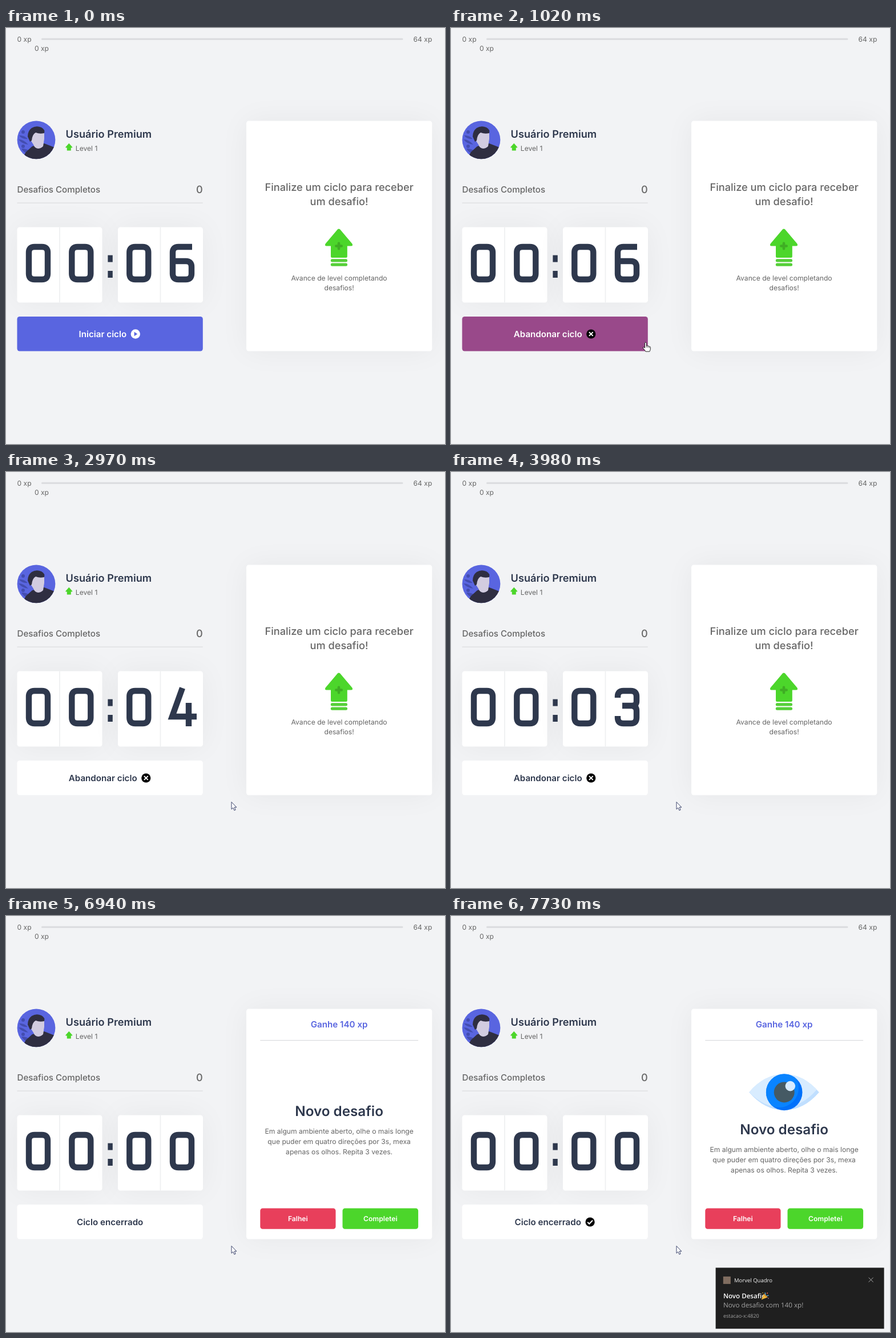
An HTML page with a canvas for the animation above (8000 ms loop, 769x728 px).

```html
<!DOCTYPE html>
<html lang="pt">
<head>
<meta charset="utf-8">
<title>Ciclo</title>
<style>
html, body { margin: 0; width: 100%; height: 100%; overflow: hidden; background: #f2f3f5; }
canvas { display: block; }
</style>
</head>
<body>
<canvas id="stage" width="769" height="728"></canvas>
<script>
const ctx = document.getElementById('stage').getContext('2d');
const LOOP = 8000, STEP = 80, REM = 12.12;
const UI = 'Inter, sans-serif', TOAST = '"Open Sans", "Noto Sans", sans-serif';
const INK = '#2e384d', GRAY = '#666666', GREEN = '#4cd62b', WHITE = '#ffffff';
const BLUE = [89, 101, 224], BLUE_DARK = [73, 83, 184], RED = [232, 63, 91];
const PAPER = [255, 255, 255], INK_RGB = [46, 56, 77];

const clamp = v => Math.max(0, Math.min(1, v));
const mix = (a, b, k) => a.map((v, i) => v + (b[i] - v) * k);
const rgb = c => `rgb(${c.map(Math.round).join(',')})`;

// y is the middle of the capital letters
function text(str, x, y, size, weight, color, align = 'left', family = UI) {
  ctx.font = `${weight} ${size}px ${family}`;
  ctx.textAlign = align;
  ctx.fillStyle = color;
  ctx.fillText(str, x, y + size * 0.364);
}

function box(x, y, w, h, r, color, shadow) {
  ctx.save();
  if (shadow) {
    ctx.shadowColor = 'rgba(0,0,0,.05)';
    ctx.shadowBlur = 52;
  }
  ctx.fillStyle = color;
  ctx.beginPath();
  ctx.roundRect(x, y, w, h, r);
  ctx.fill();
  ctx.restore();
}

function disc(x, y, r, color) {
  ctx.fillStyle = color;
  ctx.beginPath();
  ctx.arc(x, y, r, 0, Math.PI * 2);
  ctx.fill();
}

function fillPath(d, color) {
  ctx.fillStyle = color;
  ctx.fill(new Path2D(d));
}

function strokePath(d, color, width, cap = 'butt') {
  ctx.strokeStyle = color;
  ctx.lineWidth = width;
  ctx.lineCap = cap;
  ctx.stroke(new Path2D(d));
}

function at(x, y, draw) {
  ctx.save();
  ctx.translate(x, y);
  draw();
  ctx.restore();
}

// Digit centre lines in a 43 x 67 cell
const TOP_ARC = 'M5 17V15Q5 5 15 5H28Q38 5 38 15V';
const LOW_ARC = 'V52Q38 62 28 62H15Q5 62 5 52V49';
const DIGITS = [
  'M15 5H28Q38 5 38 15V52Q38 62 28 62H15Q5 62 5 52V15Q5 5 15 5Z',
  '',
  TOP_ARC + '22Q38 28 34 33L9 62M1 62H42',
  TOP_ARC + '23Q38 31 30 31H13M30 31Q38 32 38 40' + LOW_ARC,
  'M22 0L4 50H47M33 26V67',
  'M40 5H5V30H28Q38 30 38 40' + LOW_ARC,
  'M39 5H15Q5 5 5 15V52Q5 62 15 62H28Q38 62 38 52V40Q38 30 28 30H5'
];

function digit(n, x) {
  at(x, 378, () => {
    if (n === 1) fillPath('M31.5 0V67H21V12L7 20V9L22 0Z', INK);
    else strokePath(DIGITS[n], INK, 10.4);
  });
}

function header() {
  text('0 xp', 19.5, 20, REM, 400, GRAY);
  text('64 xp', 746.3, 20, REM, 400, GRAY, 'right');
  box(62, 17.7, 633.5, 3.4, 2, '#dcdde0');
  text('0 xp', 62.5, 35.3, REM, 400, GRAY, 'center');
}

function avatar() {
  ctx.save();
  ctx.beginPath();
  ctx.arc(53, 195.8, 33.4, 0, Math.PI * 2);
  ctx.clip();
  ctx.fillStyle = rgb(BLUE);
  ctx.fillRect(19, 162, 68, 68);
  const leaf = '#434db0';
  disc(30, 182, 3, leaf);
  disc(30, 207, 3, leaf);
  fillPath('M23 188Q31 187 38 194Q28 195 23 188Z', leaf);
  fillPath('M22 195Q31 195 39 204Q28 203 22 195Z', leaf);
  fillPath('M27 211Q36 211 43 216L36 219Q30 217 27 211Z', leaf);
  fillPath('M27 230L35 217L46 207L67 202L90 211V230Z', '#2f2e41');
  fillPath('M44 184L52 180L67 181V194L65 207Q61 211 56 211Q50 210 48 204L43 196Z', '#d2cce0');
  fillPath('M42 199L38 190Q38 180 45 175Q53 170 62 174Q69 178 67 184Q59 186 52 183Q46 186 45 197Z', '#2f2e41');
  ctx.restore();
}

function profile() {
  avatar();
  text('Usuário Premium', 104.6, 185.2, REM * 1.5, 600, INK);
  fillPath('M110.3 201.8L116.3 208.6Q116.6 209.6 115.4 209.6H113.8V214.6H106.8V209.6H105.2Q104 209.6 104.3 208.6Z', GREEN);
  text('Level 1', 121.8, 210.3, REM, 400, GRAY);
  text('Desafios Completos', 19.5, 282.8, REM * 1.25, 500, GRAY);
  text('0', 344.8, 282.8, REM * 1.5, 500, GRAY, 'right');
  ctx.fillStyle = '#d7d8da';
  ctx.fillRect(19.5, 305.6, 325.3, 1);
}

function countdown(sec) {
  for (const x of [19.5, 196]) {
    box(x, 348.5, 149, 132, 4.3, WHITE, true);
    ctx.fillStyle = '#eeeff1';
    ctx.fillRect(x + 73.6, 348.5, 1.7, 132);
  }
  [35, 110.3, 211.3].forEach(x => digit(0, x));
  digit(sec, 287);
  ctx.fillStyle = INK;
  ctx.fillRect(178.4, 397.6, 8.4, 12);
  ctx.fillRect(178.4, 425, 8.4, 12);
}

function button(t, q) {
  const label = (str, x, color) => text(str, x, 535.2, REM * 1.25, 600, color);
  const icon = (x, d) => {
    disc(x, 535.5, 8.1, '#000');
    at(x, 535.5, () => strokePath(d, WHITE, 2));
  };
  let bg = mix(BLUE, BLUE_DARK, clamp((q - 600) / 200));
  const fade = clamp((q - 1050) / 200);
  if (q >= 1020) bg = fade ? mix(RED, PAPER, fade) : mix(BLUE_DARK, RED, 0.5);
  box(19.5, 505, 325.3, 60.4, 4.3, rgb(bg));
  if (q < 1020) {
    label('Iniciar ciclo', 127.6, WHITE);
    disc(226.8, 535.5, 8.2, WHITE);
    fillPath('M224.6 531.8L230.2 535.5L224.6 539.2Z', rgb(bg));
  } else if (t < 6940) {
    label('Abandonar ciclo', 109.8, rgb(mix(PAPER, INK_RGB, fade)));
    icon(245.3, 'M-3.4 -3.4L3.4 3.4M3.4 -3.4L-3.4 3.4');
  } else {
    const loaded = t >= 7170;
    label('Ciclo encerrado', loaded ? 111.6 : 124, INK);
    if (loaded) icon(243.6, 'M-4.4 0.2L-1.4 3.2L4.4 -2.8');
  }
}

function lines(list, y, gap, size, weight) {
  list.forEach((s, i) => text(s, 583.6, y + i * gap, size, weight, GRAY, 'center'));
}

function waiting() {
  lines(['Finalize um ciclo para receber', 'um desafio!'], 278.3, 25.3, REM * 1.5, 500);
  fillPath('M581 352.2Q583 350.6 585 352.2L606.4 377.4Q608.4 381.4 604.5 381.6H597.8V400Q597.8 402 595.8 402H571Q569 402 569 400V381.6H561.5Q557.6 381.4 559.6 377.4Z', GREEN);
  strokePath('M583 376.8V386.2M578.3 381.5H587.7', '#3fae24', 4.6, 'round');
  box(568.8, 404.2, 29.2, 5.2, 2.5, '#55cf38');
  box(568.8, 411.6, 29.2, 5.2, 2.5, '#55cf38');
  lines(['Avance de level completando', 'desafios!'], 437.6, 17, REM, 400);
}

function eye() {
  const lid = 'M522 308.5Q549 276.8 583.5 276.8T645 308.5Q618 340 583.5 340T522 308.5Z';
  ctx.save();
  ctx.clip(new Path2D(lid));
  fillPath(lid, '#c0dfff');
  at(-4, -5, () => {
    fillPath(lid, '#d8ecff');
    ctx.fillRect(526, 270, 100, 39);
  });
  ctx.restore();
  ctx.save();
  ctx.beginPath();
  ctx.arc(583.7, 308.4, 31.8, 0, Math.PI * 2);
  ctx.clip();
  ctx.fillStyle = '#0071fb';
  ctx.fillRect(550, 275, 68, 68);
  disc(575, 301, 34, '#0a84ff');
  ctx.restore();
  disc(583.7, 308.4, 18, '#455a64');
  disc(594.3, 297.6, 8.8, '#d8ecff');
}

function challenge(loaded) {
  text('Ganhe 140 xp', 583.6, 189.6, REM * 1.25, 600, rgb(BLUE), 'center');
  ctx.fillStyle = '#dcdde0';
  ctx.fillRect(445.3, 217, 276.8, 1.3);
  if (loaded) eye();
  at(0, loaded ? 0 : -32, () => {
    text('Novo desafio', 583.6, 373.2, REM * 2, 600, INK, 'center');
    lines(['Em algum ambiente aberto, olhe o mais longe',
      'que puder em quatro direções por 3s, mexa',
      'apenas os olhos. Repita 3 vezes.'], 408.2, 18.1, REM, 400);
  });
  box(445.3, 511.4, 132.2, 36.4, 4.3, rgb(RED));
  box(589.5, 511.4, 132.6, 36.4, 4.3, GREEN);
  text('Falhei', 511.3, 529.7, REM, 600, WHITE, 'center');
  text('Completei', 655.8, 529.7, REM, 600, WHITE, 'center');
}

function popper() {
  fillPath('M80 56L84.5 46L90.5 52Z', '#f2b83c');
  strokePath('M84.5 46L90.5 52', '#d98a25', 2);
  strokePath('M87 48Q88 45 86 43.5M89 50Q91 47.5 93 49', '#58b4e8', 1.2);
  disc(90.5, 44.5, 1.1, '#e85b4a');
  disc(82.5, 44, 0.8, '#f2c94c');
  disc(92.3, 53.5, 0.8, '#e58ac0');
}

function toast(t) {
  const q = 7170 + Math.floor((t - 7170) / STEP) * STEP;
  const slide = q >= 7730 ? 0 : 70 * Math.exp((7250 - q) / 70);
  at(463.6 + slide, 615.5, () => {
    ctx.fillStyle = '#1f1f1f';
    ctx.fillRect(0, 0, 295, 106.8);
    ctx.fillStyle = '#806d60';
    ctx.fillRect(13.2, 15.4, 13, 13);
    text('Morvel Quadro', 32.4, 21.6, 9.5, 400, '#f4f4f4', 'left', TOAST);
    strokePath('M268 17.2L276 25.2M276 17.2L268 25.2', '#a8a8a8', 1);
    text('Novo Desafio', 13.3, 49.2, 11.6, 600, WHITE, 'left', TOAST);
    popper();
    text('Novo desafio com 140 xp!', 13.3, 65.3, 11.7, 400, '#a3a3a3', 'left', TOAST);
    text('estacao-x:4820', 13.3, 84, 9, 400, '#a0a0a0', 'left', TOAST);
  });
}

function cursor(q) {
  if (q < 140) return;
  const left = Math.pow(1 - clamp((q - 140) / 720), 3);
  let x = 330.5 + 388.5 * left, y = 544 + 180 * left;
  if (q >= 1020) {
    const k = clamp((q - 940) / 320), e = k * k * (3 - 2 * k);
    x += 64 * e;
    y += 33 * e;
  }
  if (q >= 780 && q < 1020) disc(x, y, 10, 'rgba(255,255,0,.5)');
  const hand = x < 345 && y < 565;
  const d = hand
    ? 'M-1 2Q0.4 -0.2 1.8 2V7Q3.6 6 4.4 7.6Q6 6.8 6.8 8.2Q8.6 7.8 8.8 9.6V13Q8.4 15 7.4 17H0.4Q-1.4 14 -4 11.2Q-4.6 9 -2.6 9.4L-1 10.8Z'
    : 'M0.5 0.5V13.2L3.4 10.6L5.4 15.2L7.6 14.2L5.6 9.8H9.4Z';
  at(x, y, () => {
    fillPath(d, WHITE);
    strokePath(d, hand ? '#111' : '#26305c', 0.9);
    if (hand) strokePath('M1.8 7V10M4.4 8V10.4M6.8 8.6V10.8', '#111', 0.7);
  });
}

function render(t) {
  const q = t < 140 ? 0 : Math.min(1260, 140 + Math.floor((t - 140) / STEP) * STEP);
  const sec = 6 - [1960, 2970, 3980, 4910, 5920, 6940].filter(k => t >= k).length;
  ctx.fillStyle = '#f2f3f5';
  ctx.fillRect(0, 0, 769, 728);
  ctx.textRendering = 'geometricPrecision';
  header();
  box(421, 162.6, 325.3, 402.8, 4.3, WHITE, true);
  countdown(sec);
  profile();
  button(t, q);
  if (sec) waiting();
  else challenge(t >= 7170);
  if (t >= 7170) toast(t);
  cursor(q);
}

let start;
function tick(now) {
  start ??= now;
  render((now - start) % LOOP);
  requestAnimationFrame(tick);
}
render(0);
requestAnimationFrame(tick);
</script>
</body>
</html>
```
